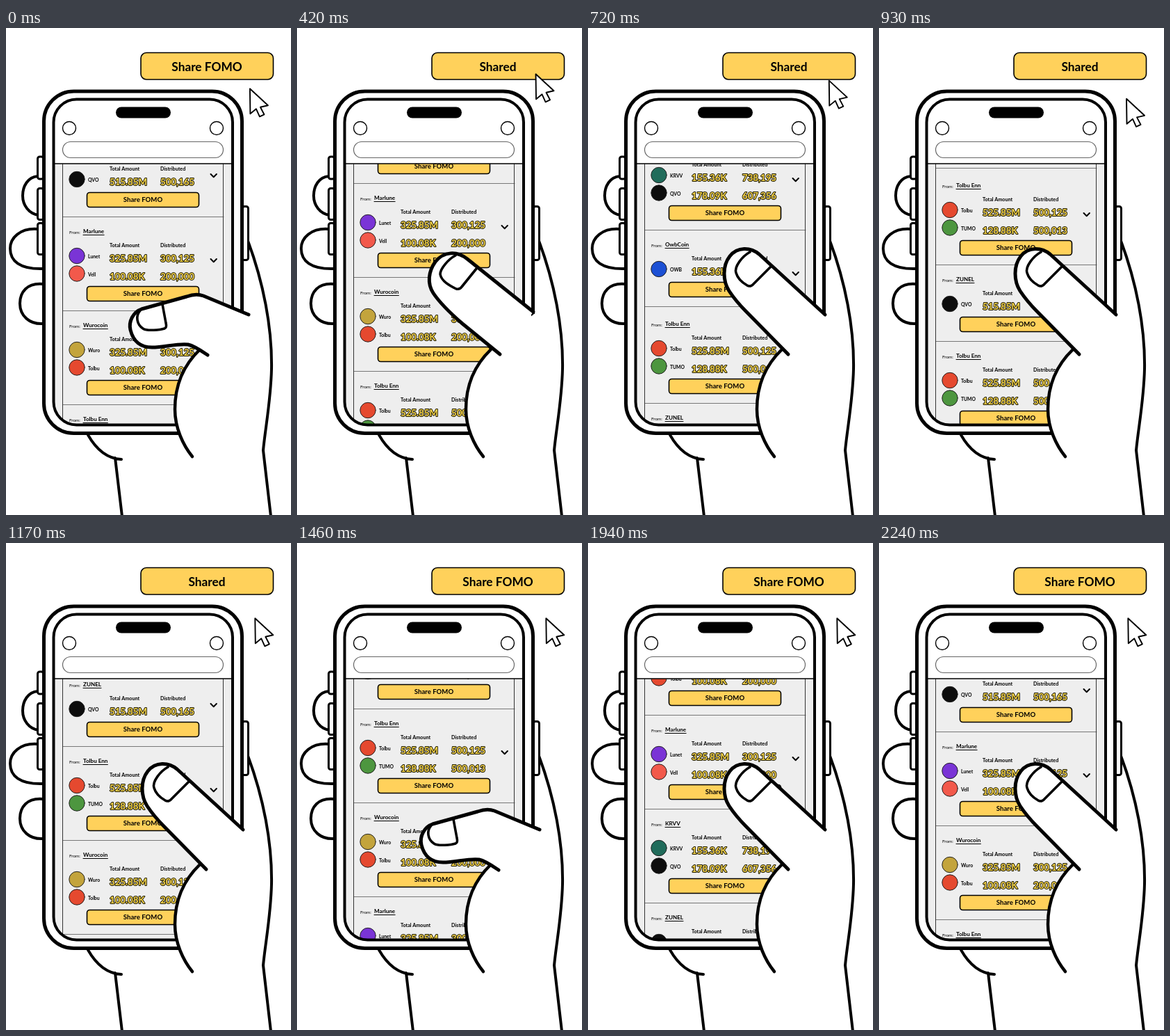
An HTML page with a canvas for the animation above (2640 ms loop, 410 by 700 pixels).

```html
<!DOCTYPE html>
<html lang="en">
<head>
<meta charset="utf-8">
<title>Share FOMO</title>
<style>
  html, body { margin: 0; width: 100%; height: 100%; overflow: hidden; background: #fff; }
  canvas { display: block; width: 410px; height: 700px; }
</style>
</head>
<body>
<canvas id="stage"></canvas>
<script>
const W = 410, H = 700, LOOP = 2640;
const INK = '#000', PAPER = '#fff', GOLD = '#ffd15b', GREY = '#eeeeee';
const canvas = document.getElementById('stage');
const ctx = canvas.getContext('2d');
const dpr = window.devicePixelRatio || 1;
canvas.width = W * dpr;
canvas.height = H * dpr;

// Coin rows: label, colour, total, distributed
const coins = {
  qvo: ['QVO', '#0d0d0d', '515.85M', '500,165'],
  qvoB: ['QVO', '#0d0d0d', '178.09K', '607,356'],
  lunet: ['Lunet', '#7a34d6', '325.85M', '300,125'],
  vell: ['Vell', '#f2594b', '100.08K', '200,000'],
  wuro: ['Wuro', '#c3a43c', '325.85M', '300,125'],
  tolbu: ['Tolbu', '#e5492f', '525.85M', '500,125'],
  tolbuB: ['Tolbu', '#e5492f', '100.08K', '200,000'],
  tumo: ['TUMO', '#4d963f', '128.88K', '500,013'],
  krvv: ['KRVV', '#216c5b', '155.36K', '738,195'],
  owb: ['OWB', '#1c50d4', '155.36K', '738,195']
};
const cards = {
  Z: { name: 'ZUNEL', rows: ['qvo'], arrow: 50 },
  M: { name: 'Marlune', rows: ['lunet', 'vell'] },
  W: { name: 'Wurocoin', rows: ['wuro', 'tolbuB'] },
  T: { name: 'Tolbu Enn', rows: ['tolbu', 'tumo'] },
  K: { name: 'KRVV', rows: ['krvv', 'qvoB'] },
  O: { name: 'OwbCoin', rows: ['owb'], pad: 4 }
};
const order = [...'ZMWTKOTZTWMK'];
const LIST_TOP = 162;
const cardHeight = c => 85 + 25 * c.rows.length;
const period = order.reduce((sum, k) => sum + cardHeight(cards[k]) + (cards[k].pad || 0), 0);

// Scroll keys of the two swipes: time, offset
const swipes = [
  [[390, 0], [420, 48], [720, 521], [1170, 878], [1290, 932]],
  [[1730, 932], [1760, 980], [1940, 1193], [2240, period]]
];

const thumbs = {
  low: {
    skin: 'M349 412L284 385C276 382 268 383 260 386L195 404C183 408 176 422 179 434C183 450 193 459 210 459C228 459 247 453 262 455C271 457 281 464 290 470',
    nail: 'M193 406C186 414 188 426 197 432C203 436 222 434 228 432C231 431 231 428 230 424L225 397'
  },
  mid: {
    skin: 'M340 408L245 332C230 320 211 321 199 336C189 350 187 367 196 381C204 393 223 412 238 425L292 469',
    nail: 'M228 327C218 332 206 346 206 354C208 364 219 370 229 375C233 376 235 375 237 372L258 346'
  },
  up: {
    skin: 'M341 412L246 325C234 315 215 314 204 328C193 342 194 364 203 378C209 387 218 398 227 407L288 469',
    nail: 'M233 322C222 328 210 343 213 352C215 359 222 366 229 370C232 372 236 371 238 368L264 342'
  }
};

const clamp = x => Math.min(1, Math.max(0, x));
const easeInOut = x => x < .5 ? 2 * x * x : 1 - 2 * (1 - x) * (1 - x);

// Cubic curve through the keys, with averaged slopes
function along(keys, t) {
  const last = keys.length - 1;
  if (t <= keys[0][0]) return keys[0][1];
  if (t >= keys[last][0]) return keys[last][1];
  const i = keys.findIndex((k, n) => n < last && t < keys[n + 1][0]);
  const rise = n => (keys[n + 1][1] - keys[n][1]) / (keys[n + 1][0] - keys[n][0]);
  const slope = n => n === 0 ? rise(0) : n === last ? rise(last - 1) : (rise(n - 1) + rise(n)) / 2;
  const [t0, a] = keys[i], [t1, b] = keys[i + 1];
  const d = t1 - t0, u = (t - t0) / d, v = 1 - u;
  return a * v * v * (1 + 2 * u) + b * u * u * (3 - 2 * u)
    + d * u * v * (slope(i) * v - slope(i + 1) * u);
}

function paint(path, width, fill, stroke = INK) {
  if (typeof path === 'string') path = new Path2D(path);
  if (fill) { ctx.fillStyle = fill; ctx.fill(path); }
  if (width) { ctx.lineWidth = width; ctx.strokeStyle = stroke; ctx.stroke(path); }
}
function box(x, y, w, h, r) {
  const p = new Path2D();
  p.roundRect(x, y, w, h, r);
  return p;
}
function disc(x, y, r) {
  const p = new Path2D();
  p.arc(x, y, r, 0, Math.PI * 2);
  return p;
}
function text(str, x, y, size, align = 'left', weight = 'bold') {
  ctx.font = `${weight} ${size}px Lato, "Open Sans", sans-serif`;
  ctx.textAlign = align;
  ctx.fillStyle = INK;
  ctx.fillText(str, x, y);
}
function amount(str, x, y) {
  ctx.font = 'bold 13.2px Lato, "Open Sans", sans-serif';
  ctx.textAlign = 'left';
  ctx.lineWidth = 1.9;
  ctx.strokeStyle = '#1c1800';
  ctx.strokeText(str, x, y);
  ctx.fillStyle = '#ffdc4e';
  ctx.fillText(str, x, y);
}

function drawCard(card, y) {
  const h = cardHeight(card);
  text('From:', 91, y + 23.5, 6.3, 'left', 'normal');
  text(card.name, 111, y + 22.5, 8.1);
  const w = ctx.measureText(card.name).width;
  paint(`M111 ${y + 25.5}h${w}`, 1);
  text('Total Amount', 149, y + 42.5, 7.2);
  text('Distributed', 222, y + 42.5, 7.2);
  card.rows.forEach((key, i) => {
    const [label, colour, total, shared] = coins[key];
    const cy = y + 55.5 + 25.5 * i;
    paint(disc(102, cy, 11.2), 1, colour, '#222');
    text(label, 118, cy + 3.5, 6.8);
    amount(total, 149, cy + 8.5);
    amount(shared, 222, cy + 8.5);
  });
  const ay = y + (card.arrow || 62);
  paint(`M294.5 ${ay - 2}l4.2 4.2l4.2 -4.2`, 2);
  paint(box(116.5, y + h - 35.5, 161, 21, 4), 1.6, GOLD);
  text('Share FOMO', 197, y + h - 21.8, 9.6, 'center');
  paint(`M82 ${y + h - .5}h231`, 1, null, '#777');
}

function drawList(offset) {
  ctx.save();
  ctx.clip(box(68.5, 102.5, 257.5, 468, 33));
  ctx.beginPath();
  ctx.rect(60, 195, 280, 380);
  ctx.clip();
  ctx.fillStyle = GREY;
  ctx.fillRect(60, 195, 280, 380);
  let y = LIST_TOP - Math.round(offset);
  for (let i = 0; y < 575; i++) {
    const card = cards[order[i % order.length]];
    const h = cardHeight(card);
    if (y + h > 190) drawCard(card, y);
    y += h + (card.pad || 0);
  }
  paint('M81.5 195V572M312.5 195V572', 1, null, '#333');
  ctx.restore();
}

function drawBackHand() {
  paint('M46 213C31 214 24 228 24 241C24 255 33 267 47 269', 4);
  paint('M46 289C20 287 6 302 6 317C6 335 20 347 53 346', 4);
  paint('M53 368C30 366 20 380 20 396C20 414 34 426 53 425', 4);
  paint('M118 585C130 606 145 619 166 620M157 618L167 702', 4);
  paint('M348 306C370 365 383 430 382 490C381 535 373 575 370 607L381 702', 4);
}

function drawPhone(offset) {
  for (const [x, y, h] of [[45.5, 185, 32], [45.5, 230.5, 45], [45.5, 280.5, 45], [340, 256.5, 77]])
    paint(box(x, y, 8.5, h, 3), 3, PAPER);
  paint(box(54.5, 91, 285, 491.5, 43), 5, PAPER);
  drawList(offset);
  paint(box(68.5, 102.5, 257.5, 468, 33), 4);
  paint('M69 195H326', 1.6);
  paint(box(158, 113.5, 79, 16, 8), 0, INK);
  paint(disc(91, 144, 9.5), 1.4, PAPER);
  paint(disc(303, 144, 9.5), 1.4, PAPER);
  paint(box(81.5, 163.5, 231, 23, 11.5), 1.2, PAPER, '#666');
}

function drawFrontHand(pose) {
  const palm = 'M279 462C255 485 243 515 243 548C243 575 255 600 268 616';
  paint(palm + 'L365 602V411H341Z', 0, PAPER);
  paint(palm, 4.5);
  paint(thumbs[pose].skin, 0, PAPER);
  paint(thumbs[pose].skin, 5);
  paint(thumbs[pose].nail, 3.6);
}

function drawCursor(p) {
  ctx.save();
  ctx.translate(358.3 - 14.8 * p, 108.3 - 42 * p);
  paint('M0 0L.5 36L9 29L14 40L20.5 37L15 26.5L26 24Z', 1.9, PAPER);
  ctx.restore();
}

function thumbPose(t) {
  if (t < 420) return 'low';
  if (t < 450) return 'mid';
  if (t < 1260) return 'up';
  if (t < 1290) return 'mid';
  if (t < 1760) return 'low';
  return t < 1790 ? 'mid' : 'up';
}

// Motion advances in 30 ms steps, with rests after each swipe
function stepTime(t) {
  if (t < 1290) return Math.floor(t / 30) * 30;
  if (t < 1760) return 1290;
  return Math.min(2240, 1760 + Math.floor((t - 1760) / 30) * 30);
}

function draw(now) {
  const t = now % LOOP, s = stepTime(t);
  const offset = along(swipes[s < 1760 ? 0 : 1], s);
  const reach = s < 540
    ? easeInOut(clamp(.5 + s / 840))
    : 1 - easeInOut(clamp((s - 540) / 540));

  ctx.setTransform(dpr, 0, 0, dpr, 0, 0);
  ctx.lineCap = ctx.lineJoin = 'round';
  ctx.fillStyle = PAPER;
  ctx.fillRect(0, 0, W, H);
  drawBackHand();
  drawPhone(offset);
  drawFrontHand(thumbPose(s));
  paint(box(194, 35.5, 190.5, 38.5, 8), 1.6, GOLD);
  text(t >= 420 && t < 1460 ? 'Shared' : 'Share FOMO', 289, 61.5, 17.3, 'center');
  drawCursor(reach);
}

const start = performance.now();
function tick() {
  draw(performance.now() - start);
  requestAnimationFrame(tick);
}
tick();
</script>
</body>
</html>
```
